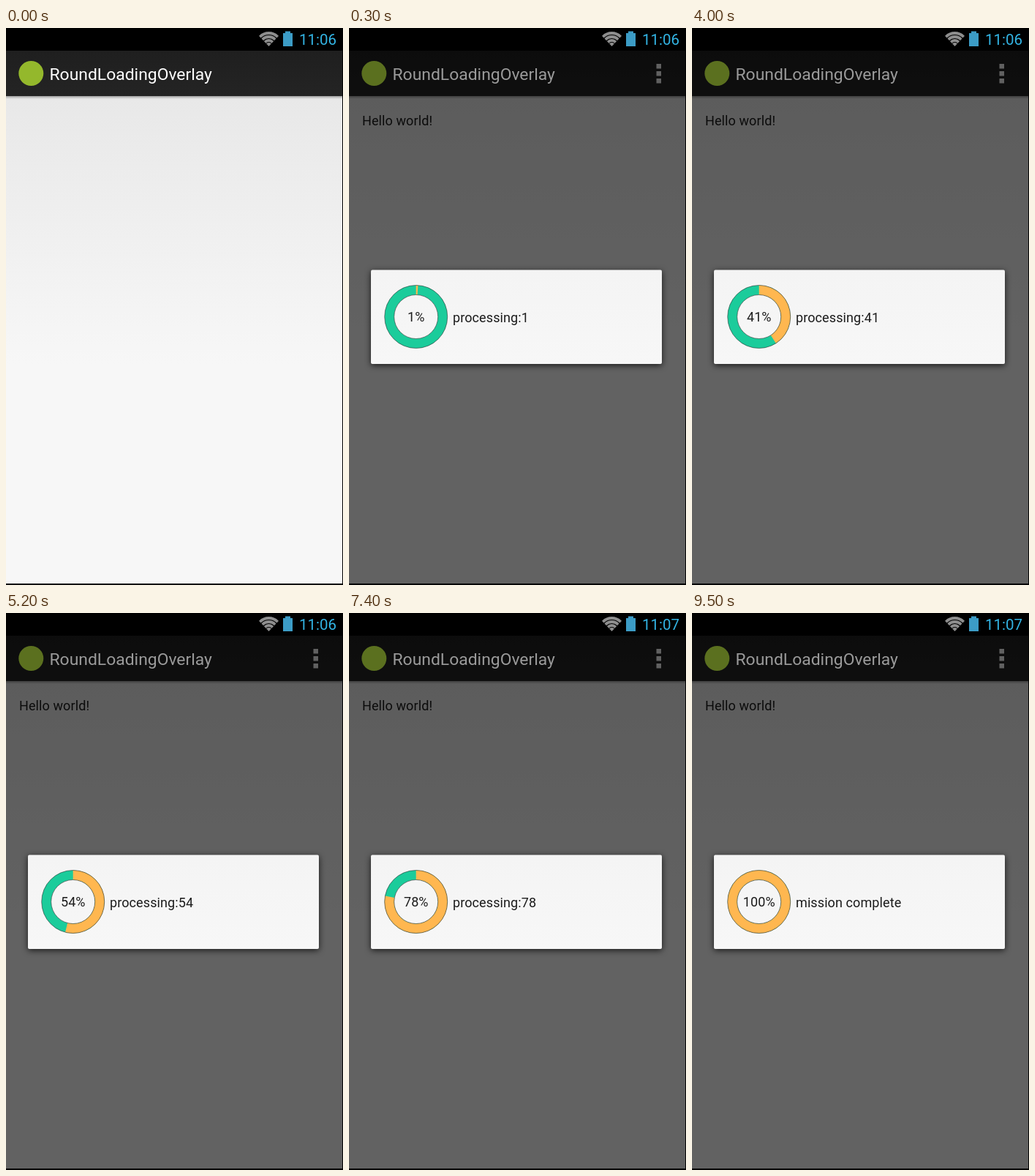
An HTML page for the animation above (10000 ms loop, 461 by 761 pixels).

```html
<!DOCTYPE html>
<html lang="en">
<head>
<meta charset="utf-8">
<title>Progress dialog</title>
<style>
  html, body { margin: 0; width: 100%; height: 100%; overflow: hidden; background: #000; }
  svg { display: block; width: 461px; height: 761px; }
  text { font-family: Roboto, "Noto Sans", sans-serif; font-size: 18px; letter-spacing: .1px; fill: #1c1c1c; }
  #clock { font-size: 20.5px; letter-spacing: 0; fill: #33b5e5; }
  #title { font-size: 22.9px; letter-spacing: 0; fill: #fff; }
  #wifi { fill: none; stroke: #8e8e8e; stroke-width: 3.8; }
  #dialog { filter: drop-shadow(0 2px 4px rgba(0, 0, 0, .75)); }
  .rim { fill: none; stroke: #333; stroke-width: .8; stroke-opacity: .75; }
  .band { fill: none; stroke-width: 13; }
</style>
</head>
<body>
<svg viewBox="0 0 461 761">
  <defs>
    <linearGradient id="page" x2="0" y2="1">
      <stop offset="0" stop-color="#e8e8e8"/>
      <stop offset=".55" stop-color="#f7f7f7"/>
    </linearGradient>
    <linearGradient id="bar" x2="0" y2="1">
      <stop offset="0" stop-color="#1f1f1f"/>
      <stop offset="1" stop-color="#242424"/>
    </linearGradient>
    <linearGradient id="shade" x2="0" y2="1">
      <stop offset="0" stop-opacity=".3"/>
      <stop offset="1" stop-opacity="0"/>
    </linearGradient>
    <linearGradient id="panel" x2="0" y2="1">
      <stop offset="0" stop-color="#f4f4f4"/>
      <stop offset="1" stop-color="#f7f7f7"/>
    </linearGradient>
    <clipPath id="fan"><path d="M359.5 25L340 4.5H379Z"/></clipPath>
  </defs>

  <rect width="461" height="761"/>
  <g id="wifi" clip-path="url(#fan)">
    <circle cx="359.5" cy="24" r="17"/>
    <circle cx="359.5" cy="24" r="12"/>
    <circle cx="359.5" cy="24" r="7"/>
    <circle cx="359.5" cy="24" r="2"/>
  </g>
  <path d="M379 7H382V4.5H389V7H392V25H379Z" fill="#3c9cc6"/>
  <text id="clock" x="401" y="23">11:06</text>

  <rect y="93" width="460" height="666" fill="url(#page)"/>
  <rect y="93" width="460" height="4" fill="url(#shade)"/>
  <rect y="31" width="460" height="62" fill="url(#bar)"/>
  <g id="content">
    <text x="18" y="132.5">Hello world!</text>
    <path d="M420.5 49h6.5v6.5h-6.5zM420.5 59h6.5v6.5h-6.5zM420.5 69h6.5v6.5h-6.5z" fill="#f4f4f4"/>
  </g>
  <rect id="dim" y="31" width="460" height="728"/>
  <g id="brand">
    <circle cx="34.3" cy="62" r="17" fill="#94b82c"/>
    <text id="title" x="59.5" y="71">RoundLoadingOverlay</text>
  </g>

  <g id="dialog">
    <rect x="30" y="330.5" width="398" height="128.5" rx="2" fill="url(#panel)"/>
    <circle class="band" cx="91.7" cy="394.5" r="36.5" stroke="#1bcc9b"/>
    <path class="band" id="arc" stroke="#ffb750"/>
    <circle class="rim" cx="91.7" cy="394.5" r="43"/>
    <circle class="rim" cx="91.7" cy="394.5" r="30"/>
    <text id="percent" x="91.8" y="401" text-anchor="middle"></text>
    <text id="status" x="142" y="401.5"></text>
  </g>
</svg>
<script>
  const LOOP = 10000, STEP = 100;
  const $ = id => document.getElementById(id);
  const CX = 91.7, CY = 394.5, R = 36.5;

  function arcPath(percent) {
    if (percent <= 0) return "";
    const turn = Math.min(percent, 99.99) / 100;
    const a = turn * 2 * Math.PI;
    const x = CX + R * Math.sin(a), y = CY - R * Math.cos(a);
    return `M${CX} ${CY - R}A${R} ${R} 0 ${turn > .5 ? 1 : 0} 1 ${x} ${y}`;
  }

  function render(step) {
    // 0: empty window, 1: dialog fading in, 2 and later: counting
    const shown = Math.min(step < 2 ? 0 : step - 1, 2) / 2;
    const percent = step < 3 ? 0 : Math.min(100, Math.floor(1.58 + 1.08 * (step - 3)));
    $("content").style.opacity = step < 2 ? 0 : 1;
    $("dim").style.opacity = .6 * shown;
    $("brand").style.opacity = 1 - .42 * shown;
    $("dialog").style.opacity = shown;
    $("arc").setAttribute("d", arcPath(percent));
    $("percent").textContent = percent + "%";
    $("status").textContent = percent < 100 ? "processing:" + percent : "mission complete";
    $("clock").textContent = step < 60 ? "11:06" : "11:07";
  }

  let last = -1;
  const start = performance.now();
  function tick() {
    const step = Math.floor((performance.now() - start) % LOOP / STEP);
    if (step !== last) render(last = step);
    requestAnimationFrame(tick);
  }
  tick();
</script>
</body>
</html>
```
